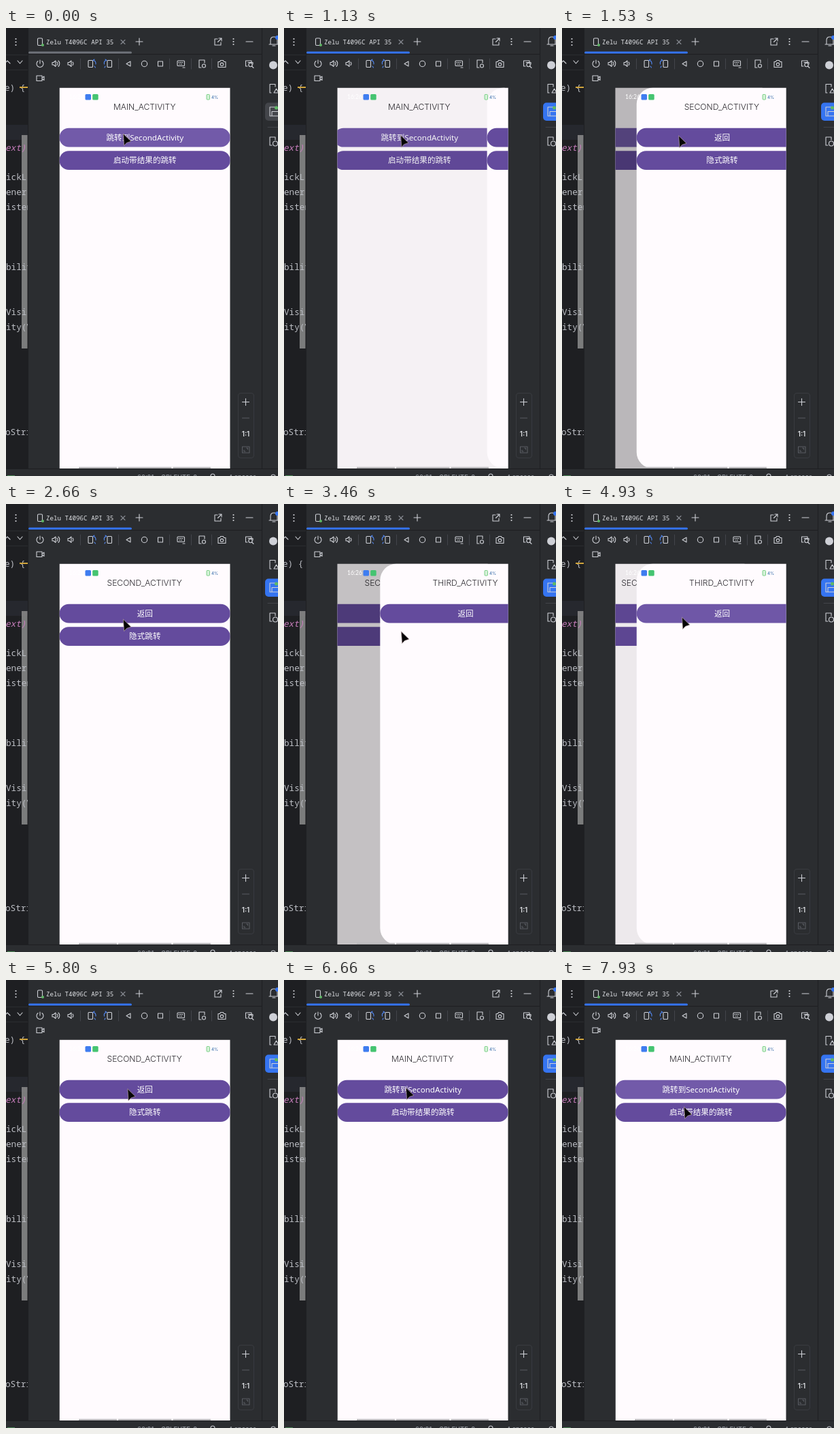
An HTML page that plays this animation: 400x657 px, repeating every 8 s.

```html
<!DOCTYPE html>
<html lang="zh">
<head>
<meta charset="utf-8">
<title>Activity navigation</title>
<style>
html, body { margin: 0; width: 100%; height: 100%; overflow: hidden; background: #2b2d30; }
svg { display: block; width: 100vw; height: 100vh; }
.icon { fill: none; stroke: #ced0d6; stroke-width: 1.1; stroke-linecap: round; stroke-linejoin: round; }
.dim { stroke: #5a5d63; }
.blue { stroke: #548af7; }
.code { font: 12.7px "Noto Sans Mono", monospace; fill: #bcbec4; }
.label { font: 11.6px "Noto Sans", "Noto Sans CJK SC", "Noto Sans CJK", sans-serif; font-weight: 500; fill: #fff; text-anchor: middle; }
.title { font: 300 12.1px Inter, sans-serif; fill: #2b292e; text-anchor: middle; }
</style>
</head>
<body>
<svg viewBox="0 0 400 657" preserveAspectRatio="none">
  <defs>
    <clipPath id="screen"><path d="M78.500 87.600H329.700V646H78.500Z"/></clipPath>
    <clipPath id="editor"><path d="M0 0H32V646H0Z"/></clipPath>
  </defs>

  <rect width="400" height="657" fill="#2b2d30"/>
  <g clip-path="url(#editor)">
    <rect width="32" height="646" fill="#1e1f22"/>
    <rect y="142" width="32" height="22" fill="#26282e"/>
    <path d="M0 39.500H32M0 61.500H32" stroke="#2b2d30"/>
    <rect x="23" y="157" width="8.500" height="313" fill="#8c8c8c" opacity=".85"/>
    <g id="code"></g>
    <path id="mark" d="M20 87H32" stroke="#d0a43c" stroke-width="2"/>
  </g>
  <path d="M32.500 0V646M376.500 0V646M33 38.500H376M0 646.500H400" stroke="#1e1f22"/>
  <rect id="tab" x="33" y="34.500" width="152" height="3" rx="1.500"/>
  <text x="59" y="23.500" font-family="Noto Sans Mono, monospace" font-size="9.200" fill="#dfe1e5">Zelu T4096C API 35</text>

  <g class="icon">
    <path d="M-2 52L2 48L6 52M17 48L20.500 52L24 48"/>
    <rect x="46.500" y="15" width="7" height="10.500" rx="1.500"/>
    <path d="M169 17.500L175 23.500M175 17.500L169 23.500" stroke="#868a91"/>
    <path d="M191 20H201M196 15V25M353 20H363"/>
    <path d="M311 16H307V25H316V21M313 15H317V19M317 15L311.500 20.500"/>
    <!-- power, volume -->
    <path d="M50 47V52M47 48.500A5 5 0 1 0 53 48.500"/>
    <path d="M68 50.500H70L73 48V56.500L70 54H68ZM75 50A3 3 0 0 1 75 54.500M77 48A6 6 0 0 1 77 56.500"/>
    <path d="M91 50.500H93L96 48V56.500L93 54H91ZM98 50A3 3 0 0 1 98 54.500"/>
    <!-- rotation -->
    <rect x="121" y="47.500" width="6.500" height="10" rx="1"/>
    <rect x="149" y="47.500" width="6.500" height="10" rx="1"/>
    <path class="blue" d="M128 47.500Q132.500 48 132 53M130 56L131.500 58M148 47.500Q143.500 48 144.500 53M146 56L145 58M128 47.500L130 46M148 47.500L146 46"/>
    <path d="M183 49V56L177 52.500Z"/>
    <circle cx="203.500" cy="52.500" r="4.200"/>
    <rect x="223.500" y="49" width="7" height="7"/>
    <rect x="252" y="48" width="10.500" height="7.500" rx="1"/>
    <path d="M254 50.500H260.500M255 53H259.500" stroke-dasharray="1 1.5"/>
    <path d="M260 58H263"/>
    <path d="M287 58H284V47H292V51"/>
    <circle cx="291" cy="55.500" r="2.500"/>
    <path d="M312 49.500H314.500L315.500 47.500H319.500L320.500 49.500H323V57.500H312Z"/>
    <circle cx="317.500" cy="53.300" r="2.200"/>
    <path d="M355 56H352.500V48H361V50"/>
    <circle cx="359.500" cy="54" r="2.700"/>
    <path d="M361.500 56L364 58.500M356 50.500H363V53"/>
    <path d="M45 70H53V77.500H45ZM53 73L56 71V76.500L53 74.500"/>
    <path d="M109.500 45V60M165.500 45V60M240.500 45V60M272.500 45V60M302.500 45V60" stroke="#43454a"/>
    <!-- zoom box -->
    <rect x="341.500" y="535.500" width="23" height="95" rx="4" stroke="#393b40"/>
    <path d="M347.500 548.500H357.500M352.500 543.500V553.500"/>
    <path class="dim" d="M347.500 572H357.500M347.500 614H358V623H347.500ZM350 619V621H352M355.500 618V616H353.500"/>
    <!-- side strip -->
    <path d="M387 24H401M389 24V18Q389 13 394 13Q399 13 399 18V24M392 26H396"/>
    <path d="M390 95H388V82.500H396V86"/>
    <path d="M394 95L397.500 89L401 95Z"/>
    <path d="M391 172H388V160H396V164"/>
    <circle cx="396" cy="169.500" r="3.500"/>
    <path d="M385 145.500H400" stroke="#43454a"/>
  </g>
  <circle cx="54" cy="25" r="2" fill="#5fb865"/>
  <circle cx="399" cy="14" r="3" fill="#3574f0"/>
  <circle cx="393" cy="54.500" r="6" fill="#ced0d6"/>
  <g fill="#ced0d6">
    <circle cx="14.500" cy="16" r="1.100"/><circle cx="14.500" cy="20.500" r="1.100"/><circle cx="14.500" cy="25" r="1.100"/>
    <circle cx="334.500" cy="16" r="1.100"/><circle cx="334.500" cy="20" r="1.100"/><circle cx="334.500" cy="24" r="1.100"/>
  </g>
  <text x="352.500" y="599" text-anchor="middle" font-family="Inter, sans-serif" font-weight="600" font-size="10" fill="#dfe1e5">1:1</text>
  <rect id="tool" x="381" y="109.500" width="24" height="26.500" rx="5"/>
  <path class="icon" d="M391 129H388V116H396M391 122.500H401V129H391Z"/>
  <circle cx="397.500" cy="117" r="2.500" fill="#5fb865"/>
  <g font-family="Inter, sans-serif" font-size="9.500" fill="#a8adb5">
    <text x="193" y="662">60:21</text><text x="228" y="662">CRLF</text><text x="252" y="662">UTF-8</text><text x="327" y="662">4 spaces</text>
  </g>
  <circle cx="304" cy="657" r="3" class="icon"/>
  <circle cx="393" cy="658" r="3" class="icon"/>
  <path d="M2 656.500H13" stroke="#4d8a57"/>

  <g clip-path="url(#screen)">
    <g id="pages"></g>
    <path d="M107 645H163M165 645H243.500M245.500 645H301" stroke="#b9b8ba" stroke-width="2.500"/>
    <text x="93" y="104.300" font-family="Lato, sans-serif" font-size="8.500" fill="#fff">16:26</text>
    <rect x="116.500" y="97" width="8.500" height="8.500" rx="1.500" fill="#3f7df0"/>
    <rect x="127.200" y="97" width="8.500" height="8.500" rx="1.500" fill="#45c471"/>
    <rect x="295" y="97.500" width="4.500" height="7.500" rx="1" fill="#d5f2d8" stroke="#7ed089"/>
    <text x="302" y="103.500" font-family="Inter, sans-serif" font-size="6" font-weight="600" fill="#5a86b8">4%</text>
  </g>
  <path id="cursor" d="M0 0L1.200 17.500L5 13.400L11.500 11.200Z" fill="#050505" stroke="#b9a3a8" stroke-width=".7" stroke-linejoin="round"/>
</svg>

<script>
const LOOP = 8000, LEFT = 78.5, TOP = 87.6, WIDTH = 251.2, HEIGHT = 558.4;
const $ = id => document.getElementById(id);

function add(parent, tag, attrs, text) {
  const node = document.createElementNS("http://www.w3.org/2000/svg", tag);
  for (const key in attrs) node.setAttribute(key, attrs[key]);
  if (text) node.textContent = text;
  return parent.appendChild(node);
}

// Editor lines: text, x, baseline
[["e) {", -2, 92], ["ext)", -1, 180], ["ickL", 0, 223], ["ener", 0, 245], ["isten", 0, 267],
 ["bilit", 0, 355], ["Visi", 0, 421], ["ity(V", 0, 443], ["oStri", -1, 597]]
  .forEach(([text, x, y]) => add($("code"), "text", {
    class: "code", x, y, style: text === "ext)" ? "fill:#c77dbb;font-style:italic" : ""
  }, text));

function makePage(title, labels) {
  const group = add($("pages"), "g", {});
  const sheet = add(group, "rect", { x: LEFT, y: TOP, width: WIDTH, height: HEIGHT, fill: "#fffbfe" });
  add(group, "text", { class: "title", x: 203.7, y: 119.5 }, title);
  const buttons = labels.map((label, i) => {
    const y = 146.8 + i * 33.5;
    const button = add(group, "rect", { x: LEFT, y, width: WIDTH, height: 27.8, rx: 13.9, fill: "#644b9d" });
    add(group, "text", { class: "label", x: 204.3, y: y + 18 }, label);
    return button;
  });
  const shade = add(group, "rect", { x: LEFT, y: TOP, width: WIDTH * 2, height: HEIGHT, opacity: 0 });
  return { group, sheet, buttons, shade };
}

const pages = [
  makePage("MAIN_ACTIVITY", ["跳转到SecondActivity", "启动带结果的跳转"]),
  makePage("SECOND_ACTIVITY", ["返回", "隐式跳转"]),
  makePage("THIRD_ACTIVITY", ["返回"])
];

const decelerate = u => 1 - (1 - u) ** 1.8;
const smooth = u => u * u * (3 - 2 * u);
const clamp = u => Math.min(1, Math.max(0, u));

const moves = [
  { start: 1085, span: 650, from: 0, to: 1 },
  { start: 3112, span: 650, from: 1, to: 2 },
  { start: 4834, span: 440, from: 2, to: 1 },
  { start: 6170, span: 440, from: 1, to: 0 }
];

// Pointer tip: time, x, y
const path = [
  [0, 172.4, 155], [900, 171.6, 157], [1600, 171.6, 158], [2400, 172.4, 169], [2660, 172.4, 169],
  [2950, 172.4, 187], [3700, 172.4, 187], [4250, 176.4, 166], [5300, 176.4, 166], [6000, 179.4, 158],
  [6930, 179.4, 158], [7200, 179.4, 165], [7730, 179.4, 165], [7930, 179.4, 186], [LOOP, 179.4, 186]
];

function place(page, x, shade = 0, radius = 0) {
  page.group.style.display = "";
  page.group.setAttribute("transform", `translate(${x})`);
  page.shade.setAttribute("opacity", shade);
  page.sheet.setAttribute("rx", radius);
}

function drawPages(t) {
  pages.forEach(page => page.group.style.display = "none");
  const move = moves.filter(m => t >= m.start).pop();
  if (!move) return place(pages[0], 0);
  const u = (t - move.start) / move.span;
  if (u >= 1) return place(pages[move.to], 0);
  const entering = move.to > move.from;
  const gap = entering ? 1 - decelerate(u) : smooth(u);
  const [depth, shade] = entering ? [40, 0.31] : [70, 0.08];
  place(pages[Math.min(move.from, move.to)], -depth * (1 - gap), shade * (1 - gap));
  place(pages[Math.max(move.from, move.to)], WIDTH * gap, 0, 24);
}

function drawPointer(t) {
  const i = path.findIndex(p => p[0] > t);
  const [t0, x0, y0] = path[i - 1], [t1, x1, y1] = path[i];
  const u = smooth((t - t0) / (t1 - t0));
  $("cursor").setAttribute("transform", `translate(${x0 + (x1 - x0) * u} ${y0 + (y1 - y0) * u})`);
}

function lighten(button, amount) {
  const mix = (a, b) => Math.round(a + (b - a) * amount);
  button.setAttribute("fill", `rgb(${mix(100, 114)},${mix(75, 90)},${mix(157, 169)})`);
}

function frame(now) {
  const t = now % LOOP;
  const focused = t >= 800;
  drawPages(t);
  drawPointer(t);
  lighten(pages[0].buttons[0], t < 1800 ? 1 : clamp((t - 6750) / 150));
  lighten(pages[2].buttons[0], 0.8 * clamp((t - 4600) / 120));
  $("tool").setAttribute("fill", focused ? "#3574f0" : "#43454a");
  $("tab").setAttribute("fill", focused ? "#3574f0" : "#6f737a");
  $("mark").style.display = t > 3460 && t < 4400 ? "none" : "";
  requestAnimationFrame(frame);
}
requestAnimationFrame(frame);
</script>
</body>
</html>
```
